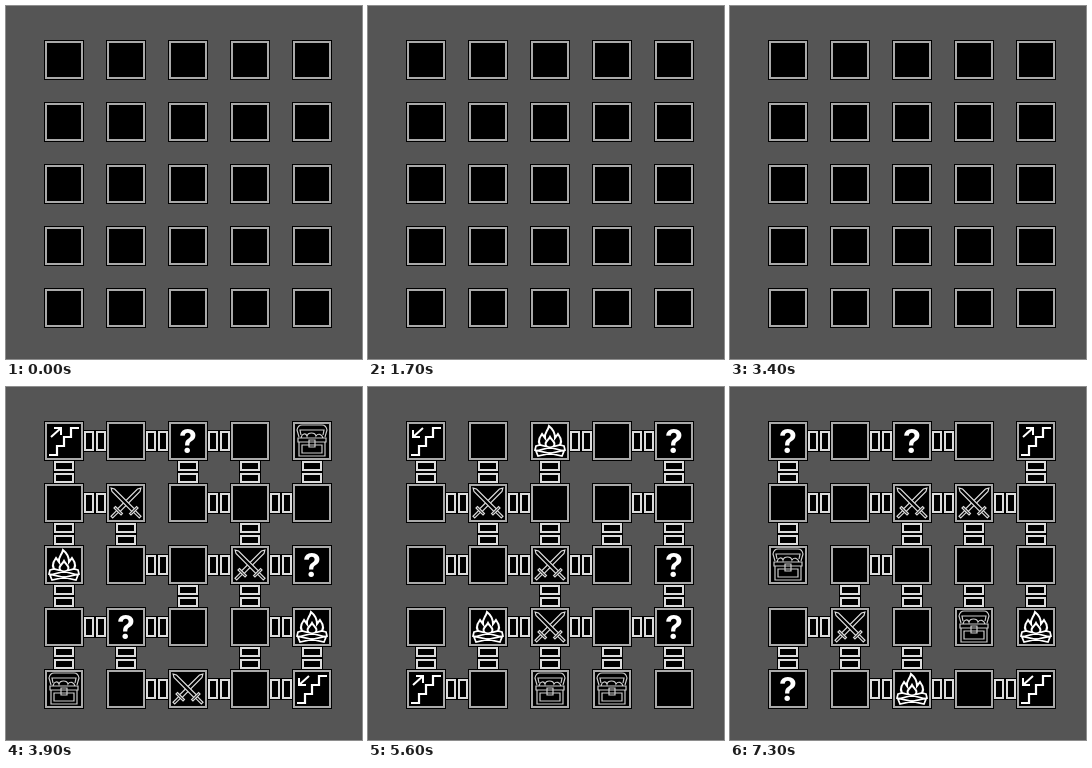
An HTML page with a canvas that plays this animation: 356x353 px, repeating every 8500 ms.

```html
<!DOCTYPE html>
<html lang="en">
<head>
<meta charset="utf-8">
<title>Dungeon map</title>
<style>
  html, body { margin: 0; width: 100%; height: 100%; overflow: hidden; background: #555; }
  canvas { display: block; }
</style>
</head>
<body>
<canvas id="stage" width="356" height="353"></canvas>
<script>
const ctx = document.getElementById('stage').getContext('2d');
const PERIOD = 1700, STEP = 100, PITCH = 62, LEFT = 58, TOP = 54;

// Rooms sit at even columns and rows; "-" and "|" are corridors.
// u/d stairs, x fight, f campfire, c chest, ? mystery
const maps = [
  ['?-.-x-.-u',
   '|   |   |',
   '. .-. .-f',
   '| |   |  ',
   'f x-.-x-.',
   '| |   | |',
   '. . c .-?',
   '| | |   |',
   'd ?-. c-.'],
  ['.-.-f .-c',
   '|   |   |',
   '?-x .-.-.',
   '  | |   |',
   '.-.-.-x ?',
   '|   | | |',
   '.-c x-. .',
   '| |   | |',
   'd-.-f ?-u'],
  ['u-.-?-. c',
   '|   | | |',
   '.-x .-.-.',
   '| |   |  ',
   'f .-.-x-?',
   '|   | |  ',
   '.-?-. .-f',
   '| |   | |',
   'c .-x-.-d'],
  ['d . f-.-?',
   '| | |   |',
   '.-x-. .-.',
   '  | | | |',
   '.-.-x-. ?',
   '    |   |',
   '. f-x-.-?',
   '| | | | |',
   'u-. c c .'],
  ['?-.-?-. u',
   '|       |',
   '.-.-x-x-.',
   '|   | | |',
   'c .-. . .',
   '  | | | |',
   '.-x . c f',
   '| | |    ',
   '? .-f-.-d']
];
const revealStep = { '-': 1, '|': 1, u: 1, d: 1, x: 2, f: 3, c: 4, '?': 5 };

const shape = {
  stairs: new Path2D('M-15 14H-7V5H0V-4H7V-13H15'),
  up: new Path2D('M-13 -4L-3 -13M-10 -13H-3V-6'),
  down: new Path2D('M-3 -13L-13 -4M-13 -11V-4H-6'),
  sword: new Path2D('M0 -21L1.8 -18V10H-1.8V-18ZM-5 10H5V12H-5ZM-1.2 12H1.2V20H-1.2Z'),
  flame: new Path2D('M-8 6C-13 2 -11 -3 -8 -7L-5 -3C-6 -8 -2 -10 -1 -15C4 -11 5 -7 5 -3L8 -7C11 -3 13 2 8 6' +
    'M-3 6C-7 2 -2 0 0 -4C2 0 7 2 3 6'),
  logs: new Path2D('M-14 5L-10 4L14 10L12 15L-15 9ZM14 5L10 4L-14 10L-12 15L15 9Z'),
  chest: new Path2D('M-13 -4L-15 -11Q-14 -16 -10 -16H10Q14 -16 15 -11L13 -4M-11 -6L-12 -11H12L11 -6' +
    'M-11 -3C-10 -8 -6 -8 -5 -5C-4 -9 3 -9 4 -5C6 -8 10 -7 11 -3' +
    'M-14 -3H14V1H-14ZM-13 1V15H13V1M-10 4H10V12H-10ZM-3 -1H3V6H-3Z')
};

function line(path, width, color = '#fff') {
  ctx.strokeStyle = color;
  ctx.lineWidth = width;
  ctx.stroke(path);
}

function solid(path, width, color) {
  ctx.fillStyle = '#000';
  ctx.fill(path);
  line(path, width, color);
}

function drawStairs(arrow) {
  line(shape.stairs, 2.2);
  line(arrow, 2);
}

const icons = {
  u: () => drawStairs(shape.up),
  d: () => drawStairs(shape.down),
  x() {
    for (const side of [1, -1]) {
      ctx.save();
      ctx.rotate(side * Math.PI / 4);
      solid(shape.sword, 1.2, '#ddd');
      ctx.restore();
    }
  },
  f() {
    line(shape.flame, 2);
    solid(shape.logs, 1.7);
  },
  c: () => line(shape.chest, 1.2, '#ccc'),
  '?'() {
    ctx.fillStyle = '#fff';
    ctx.font = 'bold 32px Inter, sans-serif';
    ctx.textAlign = 'center';
    ctx.fillText('?', 0, 11.5);
  }
};

function box(x, y, w, h, color) {
  ctx.strokeStyle = color;
  ctx.lineWidth = 2;
  ctx.strokeRect(x + 1, y + 1, w - 2, h - 2);
}

function room() {
  ctx.fillStyle = '#000';
  ctx.fillRect(-20, -20, 40, 40);
  box(-19, -19, 38, 38, '#aaa');
}

function corridor(vertical) {
  if (vertical) ctx.rotate(Math.PI / 2);
  ctx.fillStyle = '#000';
  ctx.fillRect(-11, -11, 22, 22);
  for (const x of [-11, 1]) box(x, -10, 10, 20, '#ddd');
}

function draw(now) {
  const map = maps[Math.floor(now / PERIOD) % maps.length];
  const step = Math.floor(now % PERIOD / STEP);
  ctx.fillStyle = '#555';
  ctx.fillRect(0, 0, 356, 353);
  map.forEach((row, j) => [...row].forEach((cell, i) => {
    if (cell === ' ') return;
    const visible = step >= revealStep[cell];
    ctx.save();
    ctx.translate(LEFT + i * PITCH / 2, TOP + j * PITCH / 2);
    if (cell === '-' || cell === '|') {
      if (visible) corridor(cell === '|');
    } else {
      room();
      if (visible) icons[cell]();
    }
    ctx.restore();
  }));
}

const start = performance.now();
function tick() {
  draw(performance.now() - start);
  requestAnimationFrame(tick);
}
tick();
</script>
</body>
</html>
```
